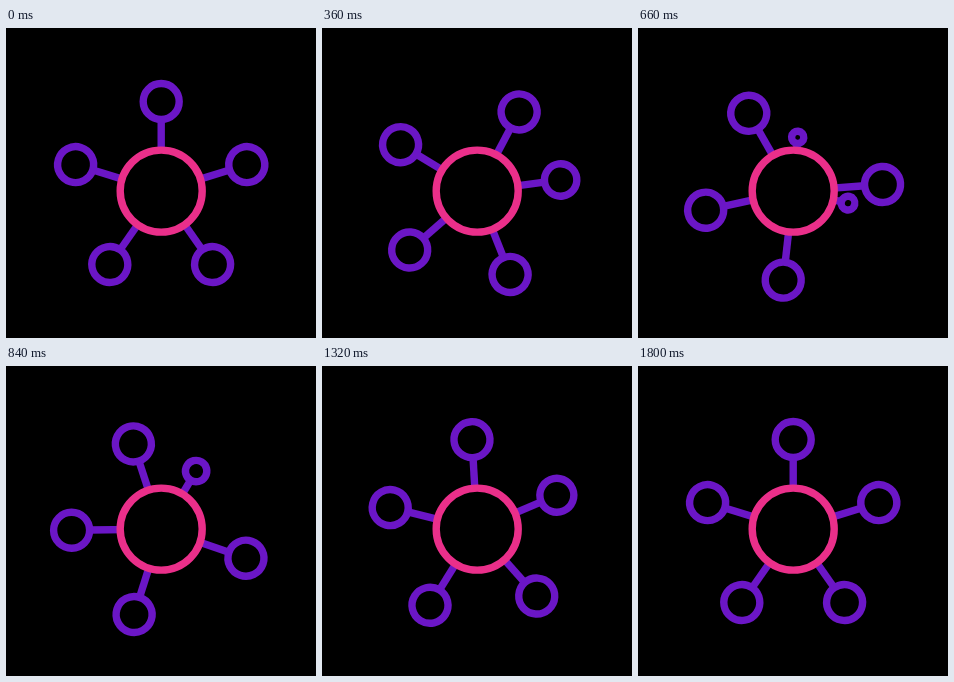
Animation of 310 by 310 pixels, one loop 1830 ms. Source, as an HTML page:

```html
<!DOCTYPE html>
<html lang="en">
<head>
<meta charset="utf-8">
<title>Orbiting nodes</title>
<style>
  html, body { margin: 0; width: 100%; height: 100%; overflow: hidden; background: #000; }
  svg { display: block; width: 100vw; height: 100vh; }
  circle, line { fill: #000; stroke-width: 7.4; }
  #arms { stroke: #6b16c6; }
  #hub { stroke: #ea2f8a; }
</style>
</head>
<body>
<svg viewBox="0 0 310 310">
  <g transform="translate(155.2 163.1)">
    <g id="arms"></g>
    <circle id="hub" r="41"/>
  </g>
</svg>
<script>
const LOOP = 1830, STEP = 30, TURN = 1800;
const SLOTS = [0, 72.8, 145, 215, 287.2, 360];
const REACH = 89.6, SIZE = 18, DIVE = 54;
const SHRINK_END = 0.43, GROW_START = 0.267;

const arms = Array.from({ length: 6 }, () => {
  const group = add(document.getElementById('arms'), 'g');
  return { group, line: add(group, 'line'), ring: add(group, 'circle') };
});

function add(parent, tag) {
  return parent.appendChild(document.createElementNS('http://www.w3.org/2000/svg', tag));
}

// Cubic Bezier easing (0.33, 0, 0.2, 1)
function ease(x) {
  let lo = 0, hi = 1;
  for (let i = 0; i < 30; i++) {
    const s = (lo + hi) / 2, r = 1 - s;
    if (0.99 * s * r * r + 0.6 * s * s * r + s * s * s < x) lo = s;
    else hi = s;
  }
  return lo * lo * (3 - 2 * lo);
}

// depth 0 is fully extended, depth 1 is hidden behind the hub
function place({ group, line, ring }, angle, depth = 0) {
  const dist = REACH - DIVE * depth;
  const size = SIZE * (1 - depth);
  group.style.display = depth < 1 ? '' : 'none';
  group.setAttribute('transform', `rotate(${angle})`);
  line.setAttribute('y2', size - dist);
  ring.setAttribute('cy', -dist);
  ring.setAttribute('r', Math.max(size, 0));
}

function between(from, to, e) {
  return SLOTS[from] + (SLOTS[to] - SLOTS[from]) * e;
}

function draw() {
  const time = Math.floor(performance.now() % LOOP / STEP) * STEP;
  const p = time / TURN;
  const e = ease(p);

  // Three nodes advance one slot, the top one skips ahead by two
  for (let i = 2; i < 5; i++) place(arms[i], between(i, i + 1, e));
  place(arms[0], between(0, 2, e));

  // The right node sinks into the hub while its successor spirals out
  const sink = Math.min(1, (p / SHRINK_END) ** 3);
  const left = Math.min(1, (1 - p) / (1 - GROW_START)) ** 2.84;
  place(arms[1], SLOTS[1] + 50 * e, sink);
  place(arms[5], SLOTS[1] - 103 * left, left);

  requestAnimationFrame(draw);
}
draw();
</script>
</body>
</html>
```
